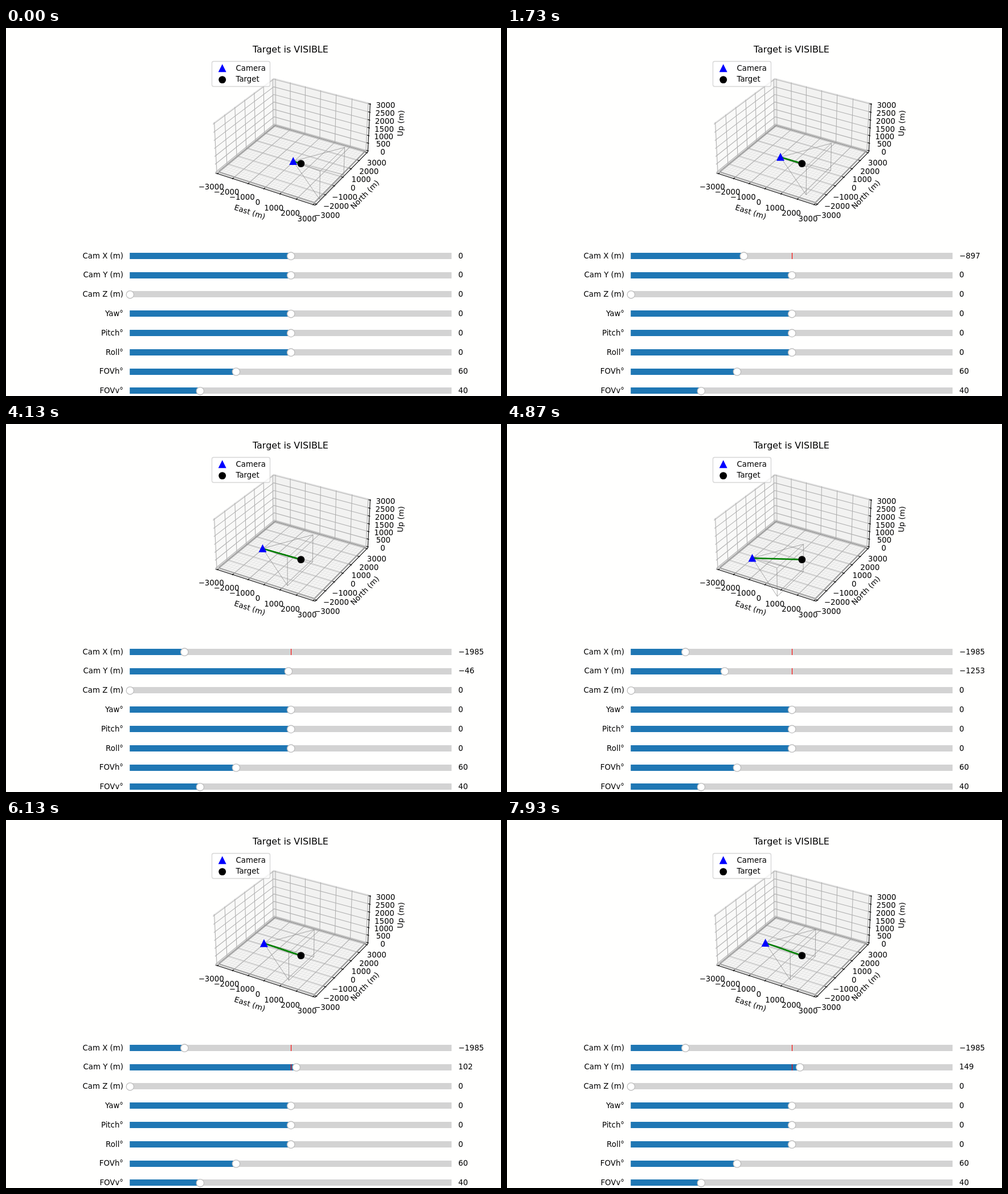
Recreate the animation shown at these times as an HTML page with a canvas. Size 869 by 645 pixels, loop 8000 ms.

```html
<!DOCTYPE html>
<html lang="en">
<head>
<meta charset="utf-8">
<title>Camera visibility</title>
<style>
  html, body { margin: 0; width: 100%; height: 100%; overflow: hidden; background: #fffffe; }
  canvas { display: block; }
</style>
</head>
<body>
<canvas id="stage" width="869" height="645"></canvas>
<script>
const ctx = document.getElementById('stage').getContext('2d');
const LOOP = 8000, TICK = 1000 / 15;
const LIMIT = 3125, FLOOR = -62.5, CEILING = 3062.5;
const FAR = 2475, TARGET = [500, 0, 0];
const HALF_FOV_H = Math.PI / 6, HALF_FOV_V = Math.PI / 9;

// Turning points of the two drags: [tick, metres]
const dragX = [[12, 0], [26, -897], [35, -1818], [39, -1985]];
const dragY = [[61, 0], [62, -46], [71, -982], [80, -2203], [82, -1933],
  [101, 1933], [103, 2040], [110, 920], [118, 149]];

// The plot refreshes eight times a second, shown on the next tick
function refreshTick(t) {
  const first = 12.5, step = 1.875;
  const tick = Math.floor((t + 5) / TICK);
  return Math.ceil(first + step * Math.floor((tick - first) / step));
}

function valueAt(keys, t) {
  if (t <= keys[0][0]) return keys[0][1];
  const next = keys.findIndex(([time]) => time >= t);
  if (next < 0) return keys[keys.length - 1][1];
  const [t0, a] = keys[next - 1], [t1, b] = keys[next];
  return a + (b - a) * (t - t0) / (t1 - t0);
}

const range = (from, to, step) =>
  Array.from({ length: Math.round((to - from) / step) + 1 }, (_, i) => from + i * step);

// Perspective view: elevation 30°, azimuth -60°, eye 10 units away
function project([east, north, up]) {
  const k = 0.20327e-3;
  const x = east * k, y = north * k, z = (up - 1500) * k;
  const depth = 10 - (0.433 * x - 0.75 * y + 0.5 * z);
  return [
    504.2 + 1565 * (0.866 * x + 0.5 * y) / depth,
    192.8 - 1565 * (-0.25 * x + 0.433 * y + 0.866 * z) / depth
  ];
}

function trace(points) {
  ctx.beginPath();
  points.forEach(p => ctx.lineTo(...project(p)));
}

function line(points, color, width) {
  trace(points);
  ctx.strokeStyle = color;
  ctx.lineWidth = width;
  ctx.stroke();
}

function pane(points, fill) {
  trace(points);
  ctx.fillStyle = fill;
  ctx.fill();
}

function paint(fill, stroke) {
  ctx.fillStyle = fill;
  ctx.strokeStyle = stroke;
  ctx.lineWidth = 1.33;
  ctx.fill();
  ctx.stroke();
}

function text(str, x, y, align = 'center', size = 13.333) {
  ctx.font = size + 'px "DejaVu Sans", sans-serif';
  ctx.textAlign = align;
  ctx.fillStyle = '#000';
  ctx.fillText(str, x, y);
}

function turnedText(str, x, y, degrees) {
  ctx.save();
  ctx.translate(x, y);
  ctx.rotate(degrees * Math.PI / 180);
  text(str, 0, 4.5);
  ctx.restore();
}

const format = v => String(Math.round(v)).replace('-', '\u2212');

function tickLabel(value, point, dy = 0) {
  const [x, y] = project(point);
  text(format(value), x, y + 4.9 + dy);
}

function cameraMark(x, y) {
  const r = 5.9;
  ctx.beginPath();
  ctx.moveTo(x, y - r);
  ctx.lineTo(x - r, y + r);
  ctx.lineTo(x + r, y + r);
  ctx.closePath();
  paint('#00f', '#00f');
}

function targetMark(x, y) {
  ctx.beginPath();
  ctx.arc(x, y, 6.45, 0, 7);
  ctx.fillStyle = '#000';
  ctx.fill();
}

function drawAxes() {
  const L = LIMIT, F = FLOOR, C = CEILING;
  const major = range(-3000, 3000, 1000), heights = range(0, 3000, 500);
  const grid = points => line(points, '#b0b0b0', 1.07);
  const axis = points => line(points, '#000', 1.07);

  pane([[-L, -L, F], [-L, L, F], [-L, L, C], [-L, -L, C]], '#f9f9f8');
  pane([[-L, L, F], [L, L, F], [L, L, C], [-L, L, C]], '#f2f2f1');
  pane([[-L, -L, F], [L, -L, F], [L, L, F], [-L, L, F]], '#f6f6f5');
  line([[-L, -L, F], [-L, L, F], [L, L, F]], '#c4c4c4', 1.07);
  line([[-L, -L, C], [-L, L, C], [L, L, C]], '#dcdcdc', 1);
  line([[-L, L, F], [-L, L, C]], '#dcdcdc', 1);

  for (const m of range(-3000, 3000, 200)) {
    line([[m, -3000, 0], [m, 3000, 0]], '#dedede', 0.7);
    line([[-3000, m, 0], [3000, m, 0]], '#dedede', 0.7);
  }
  for (const m of major) {
    grid([[m, -L, F], [m, L, F], [m, L, C]]);
    grid([[L, m, F], [-L, m, F], [-L, m, C]]);
  }
  for (const h of heights) grid([[-L, -L, h], [-L, L, h], [L, L, h]]);
  line([[-3000, -3000, 0], [-3000, 3000, 0], [3000, 3000, 0], [3000, -3000, 0], [-3000, -3000, 0]], '#929292', 1.4);

  axis([[-L, -L, F], [L, -L, F]]);
  axis([[L, -L, F], [L, L, F]]);
  axis([[L, L, F], [L, L, C]]);

  const inner = L - 104, outer = L + 52, away = L + 640;
  for (const m of major) {
    axis([[m, -inner, F], [m, -outer, F]]);
    axis([[inner, m, F], [outer, m, F]]);
    tickLabel(m, [m, -away, -550]);
    tickLabel(m, [away, m, -550]);
  }
  for (const h of heights) {
    axis([[inner, L, h], [outer, L, h]]);
    tickLabel(h, [away, away, h], 5.2);
  }
  turnedText('East (m)', 428, 322.6, 17.6);
  turnedText('North (m)', 630, 292, -45.5);
  turnedText('Up (m)', 693, 167, -87.3);
}

function drawScene(camX, camY, visible) {
  const camera = [camX, camY, 0];
  const halfW = FAR * Math.tan(HALF_FOV_H), halfH = FAR * Math.tan(HALF_FOV_V);
  const corners = [[1, 1], [-1, 1], [-1, -1], [1, -1]]
    .map(([side, up]) => [camX + FAR, camY + side * halfW, up * halfH]);
  corners.forEach((corner, i) =>
    line([camera, corner, corners[(i + 1) % 4]], '#808080', 0.67));
  line([camera, TARGET], visible ? '#008000' : '#f00', 2.67);
  cameraMark(...project(camera));
  targetMark(...project(TARGET));
}

function drawLegend() {
  ctx.beginPath();
  ctx.roundRect(361.5, 58.5, 102, 44, 3);
  paint('rgba(255,255,255,.8)', 'rgba(204,204,204,.8)');
  cameraMark(379.7, 70.7);
  targetMark(379.7, 90.6);
  text('Camera', 403.5, 75, 'left');
  text('Target', 403.5, 94.2, 'left');
}

function drawSlider(row, label, value, min = -180, max = 180, initial = value) {
  const left = 217.3, width = 564.9, height = 11;
  const offset = row * 33.8, top = Math.floor(394.2 + offset);
  const place = v => left + width * (v - min) / (max - min);
  const bar = (color, x, w) => {
    ctx.fillStyle = color;
    ctx.fillRect(x, top, w, height);
  };
  bar('#d3d3d3', left, width);
  bar('#1f77b4', left, place(value) - left);
  bar('#f00', Math.round(place(initial)), 1.1);
  ctx.beginPath();
  ctx.arc(place(value) + 0.5, 399.7 + offset, 6.67, 0, 7);
  paint('#fff', '#bfbfbf');
  text(label, 206, 403.5 + offset, 'right');
  text(format(value), 794, 403.5 + offset, 'left');
}

function draw(t) {
  const tick = refreshTick(t);
  const camX = valueAt(dragX, tick), camY = valueAt(dragY, tick);
  const visible = Math.abs(camY) < (TARGET[0] - camX) * Math.tan(HALF_FOV_H);

  ctx.fillStyle = '#fffffe';
  ctx.fillRect(0, 0, 869, 645);
  text(visible ? 'Target is VISIBLE' : 'Target is NOT visible', 499.4, 43, 'center', 16);
  drawAxes();
  drawScene(camX, camY, visible);
  drawLegend();
  [
    ['Cam X (m)', camX, -3000, 3000, 0],
    ['Cam Y (m)', camY, -3000, 3000, 0],
    ['Cam Z (m)', 0, 0, 3000],
    ['Yaw°', 0],
    ['Pitch°', 0],
    ['Roll°', 0],
    ['FOVh°', 60, 1],
    ['FOVv°', 40, 1]
  ].forEach((slider, row) => drawSlider(row, ...slider));
}

const start = performance.now();
function frame() {
  draw((performance.now() - start) % LOOP);
  requestAnimationFrame(frame);
}
frame();
</script>
</body>
</html>
```
